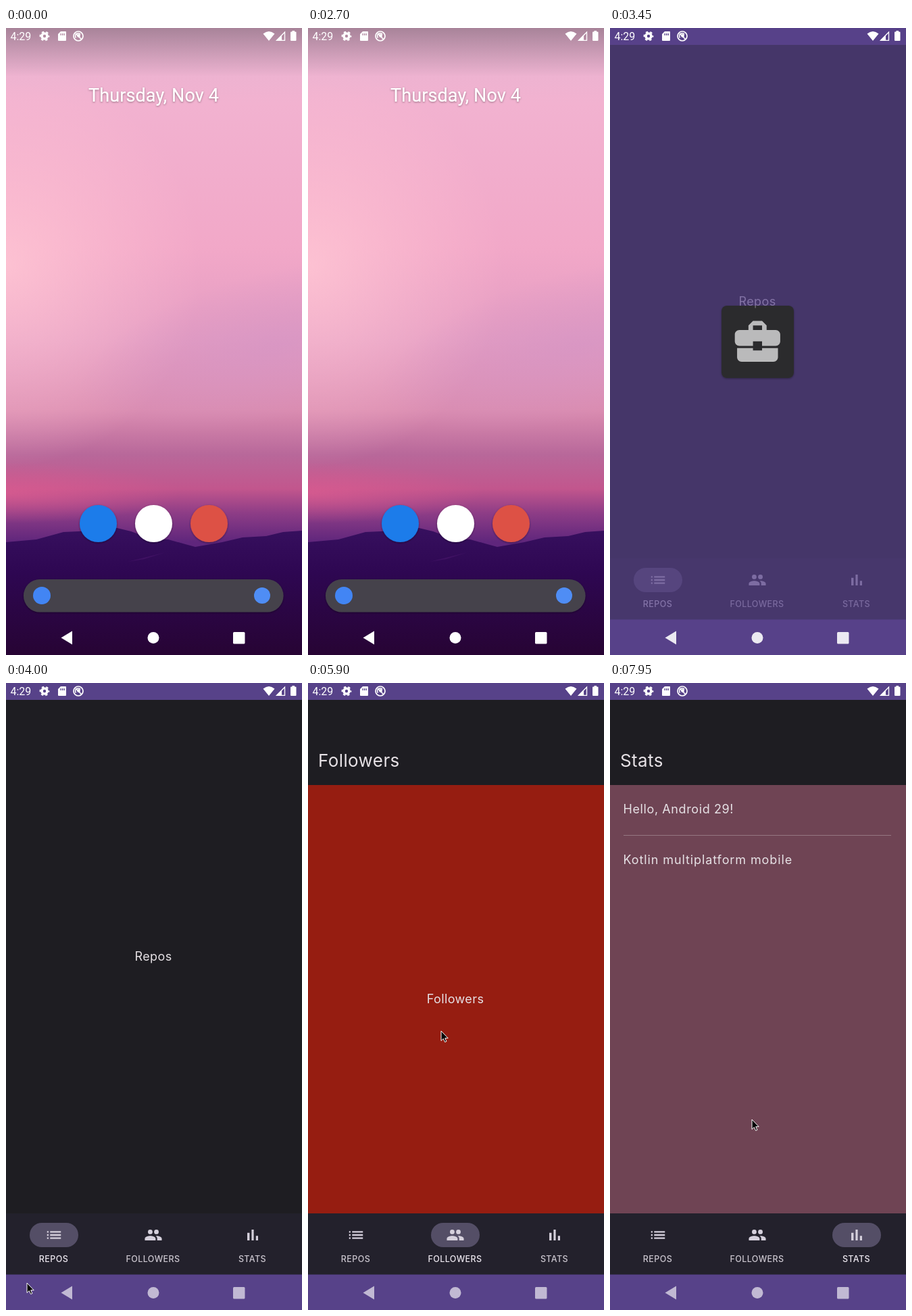
An HTML page that plays this animation: 438x928 px, repeating every 8000 ms.

```html
<!DOCTYPE html>
<html lang="en">
<head>
<meta charset="utf-8">
<title>Phone app launch</title>
<style>
html, body { margin: 0; width: 100%; height: 100%; overflow: hidden; background: #1e1d22; }
svg { display: block; width: 438px; height: 928px; font-family: Inter, "Open Sans", sans-serif; }
.roboto { font-family: Roboto, sans-serif; fill: #fff; }
.body { font-size: 18px; fill: #e6e1e5; letter-spacing: .4px; }
.title { font-size: 26px; fill: #e6e1e5; letter-spacing: .4px; }
.tab { font-size: 12.5px; font-weight: 500; letter-spacing: .4px; }
.mid { text-anchor: middle; }
</style>
</head>
<body>
<svg viewBox="0 0 438 928">
  <defs>
    <linearGradient id="sky" x2="0" y2="1">
      <stop offset="0" stop-color="#e6b4d2"/>
      <stop offset=".12" stop-color="#f2b2d0"/>
      <stop offset=".35" stop-color="#f2a8c8"/>
      <stop offset=".5" stop-color="#e39cc2"/>
      <stop offset=".61" stop-color="#da8cb0"/>
      <stop offset=".68" stop-color="#b8689a"/>
      <stop offset=".735" stop-color="#c2568d"/>
      <stop offset=".775" stop-color="#8c3c86"/>
      <stop offset=".82" stop-color="#5f267c"/>
    </linearGradient>
    <radialGradient id="glow" gradientUnits="userSpaceOnUse" cx="0" cy="0" r="1"
      gradientTransform="translate(0 350) scale(290 300)">
      <stop offset="0" stop-color="#ffc6d4" stop-opacity=".85"/>
      <stop offset="1" stop-color="#ffc0d2" stop-opacity="0"/>
    </radialGradient>
    <radialGradient id="haze" gradientUnits="userSpaceOnUse" cx="0" cy="0" r="1"
      gradientTransform="translate(400 470) rotate(-14) scale(300 110)">
      <stop offset="0" stop-color="#d494c4" stop-opacity=".65"/>
      <stop offset="1" stop-color="#d494c4" stop-opacity="0"/>
    </radialGradient>
    <radialGradient id="dusk" gradientUnits="userSpaceOnUse" cx="0" cy="0" r="1"
      gradientTransform="translate(0 688) scale(260 45)">
      <stop offset="0" stop-color="#dc5c90" stop-opacity=".75"/>
      <stop offset="1" stop-color="#dc5c90" stop-opacity="0"/>
    </radialGradient>
    <linearGradient id="hill" x2="0" y2="1">
      <stop offset="0" stop-color="#37105f"/>
      <stop offset=".35" stop-color="#2e0752"/>
      <stop offset="1" stop-color="#270434"/>
    </linearGradient>
    <linearGradient id="scrim" x2="0" y2="1">
      <stop offset="0" stop-color="#000" stop-opacity=".27"/>
      <stop offset="1" stop-color="#000" stop-opacity="0"/>
    </linearGradient>
    <filter id="shadow" x="-20%" y="-20%" width="140%" height="150%">
      <feDropShadow dx="0" dy="1" stdDeviation="1.5" flood-opacity=".4"/>
    </filter>
  </defs>

  <g id="home">
    <rect width="438" height="928" fill="url(#sky)"/>
    <rect width="438" height="928" fill="url(#glow)"/>
    <rect width="438" height="928" fill="url(#haze)"/>
    <rect width="438" height="928" fill="url(#dusk)"/>
    <path fill="url(#hill)" d="M0 761L45 757 85 746 130 744 160 739 185 745 215 756 240 757 280 768 320 761 350 754 385 752 410 746 438 744V928H0z"/>
    <path fill="#4a176c" opacity=".6" d="M180 790L236 776 205 786z"/>
    <rect width="438" height="72" fill="url(#scrim)"/>
    <text class="roboto mid" x="218.5" y="109" font-size="27" letter-spacing=".1" filter="url(#shadow)">Thursday, Nov 4</text>
    <g filter="url(#shadow)">
      <circle cx="136.5" cy="733.5" r="27.5" fill="#1a7bea"/>
      <circle cx="218.5" cy="733.5" r="27.5" fill="#fff"/>
      <circle cx="300.5" cy="733.5" r="27.5" fill="#dd5144"/>
      <rect x="26" y="816" width="384.5" height="48.5" rx="24.2" fill="#45434c"/>
    </g>
    <circle cx="53" cy="840" r="13" fill="#4285f4"/>
    <circle cx="379" cy="840" r="12" fill="#4f8df5"/>
  </g>

  <g id="app">
    <rect width="438" height="928" fill="#1e1d22"/>
    <g id="repos"><text class="body mid" x="218" y="411">Repos</text></g>
    <g id="followers">
      <rect y="25" width="438" height="127" fill="#1e1d22"/>
      <rect y="151" width="438" height="635" fill="#961d11"/>
      <text class="title" x="15" y="124">Followers</text>
      <text class="body mid" x="218" y="474">Followers</text>
    </g>
    <g id="stats">
      <rect y="25" width="438" height="127" fill="#1e1d22"/>
      <rect y="151" width="438" height="635" fill="#6f4454"/>
      <text class="title" x="15" y="124">Stats</text>
      <text class="body" x="19.5" y="193" style="letter-spacing:.6px">Hello, Android 29!</text>
      <rect x="20" y="225" width="396" height="1" fill="#957782"/>
      <text class="body" x="19.5" y="268" style="letter-spacing:.9px">Kotlin multiplatform mobile</text>
    </g>
    <rect y="785" width="438" height="91" fill="#23212c"/>
    <g id="tabs"></g>
    <path fill="#574289" d="M0 0h438v25H0zM0 875.500h438V928H0z"/>
  </g>

  <g id="splash">
    <rect width="438" height="928" fill="#574289"/>
    <rect x="165" y="411" width="107" height="107" rx="8" fill="#313133" filter="url(#shadow)"/>
    <path fill="#fff" transform="translate(218.300 463.700) scale(3.360) translate(-12 -12)" d="M10 16v-1H3v4c0 1.100.9 2 2 2h14c1.100 0 2-.9 2-2v-4h-7v1zM20 7h-4V5l-2-2h-4L8 5v2H4C2.900 7 2 7.900 2 9v3c0 1.100.9 2 2 2h6v-2h4v2h6c1.100 0 2-.9 2-2V9c0-1.100-.9-2-2-2zM14 7h-4V5h4z"/>
  </g>

  <g id="status" fill="#fff">
    <text class="roboto" x="6.500" y="18" font-size="16">4:29</text>
    <circle cx="57" cy="12" r="4" fill="none" stroke="#fff" stroke-width="3.600"/>
    <circle cx="57" cy="12" r="6.400" fill="none" stroke="#fff" stroke-width="2" stroke-dasharray="3.350" stroke-dashoffset="1.670"/>
    <path fill-rule="evenodd" d="M81 5h7q1 0 1 1v12q0 1-1 1H78q-1 0-1-1V9zM80.500 8v3h1.300V8zM83 8v3h1.300V8zM85.500 8v3h1.300V8z"/>
    <g fill="none" stroke="#fff" stroke-width="1.700">
      <circle cx="107" cy="12" r="7"/>
      <path d="M103.500 14.500a4 4 0 0 1 6.500-5M103 8l8.500 8.500"/>
    </g>
    <circle cx="107.500" cy="11.500" r="2.400"/>
    <path d="M380.500 8.500Q389 1.500 397.500 8.500L389 19zM421 6.500q0-1 1-1h1.500V4h3.500v1.500h1.500q1 0 1 1V18q0 1-1 1H422q-1 0-1-1z"/>
    <path d="M400.500 18.300H412.500V6.200z" fill="none" stroke="#fff" stroke-width="1.300"/>
    <path d="M400 18.500H408V10.500z"/>
  </g>
  <g id="nav" fill="#fff">
    <path d="M81.500 902.500L98 892.500V912.500z"/>
    <circle cx="218" cy="902.500" r="8.500"/>
    <rect x="336" y="894" width="17.500" height="17.500" rx="1.500"/>
  </g>
  <path id="cursor" d="M0 0v14.500l3.300-3 2.300 5 2.300-1-2.200-4.800h4.500z" fill="#000" stroke="#fff"/>
</svg>
<script>
const LOOP = 8000, FOLLOWERS_AT = 5400, STATS_AT = 6900;
const $ = id => document.getElementById(id);
const clamp = v => Math.max(0, Math.min(1, v));
const ramp = (t, start, length) => clamp((t - start) / length);
const smooth = p => p * p * (3 - 2 * p);
const fade = (id, v) => $(id).setAttribute('opacity', v);

const tabs = [
  ['REPOS', 71, 'M3 13h2v-2H3zM3 17h2v-2H3zM3 9h2V7H3zM7 13h14v-2H7zM7 17h14v-2H7zM7 7v2h14V7z'],
  ['FOLLOWERS', 218, 'M16 11a3 3 0 1 0 0-6 3 3 0 0 0 0 6zM8 11a3 3 0 1 0 0-6 3 3 0 0 0 0 6zM8 13c-2.300 0-7 1.200-7 3.500V19h14v-2.500c0-2.300-4.700-3.500-7-3.500zM16 13l-1 .05c1.200.85 2 2 2 3.450V19h6v-2.500c0-2.300-4.700-3.500-7-3.500z'],
  ['STATS', 365, 'M5 9.200h3V19H5zM10.600 5h2.800v14h-2.800zM16.200 13H19v6h-2.800z']
];
$('tabs').innerHTML = tabs.map(([name, x, icon], i) => `
  <g transform="translate(${x} 817)">
    <rect id="pill${i}" x="-36" y="-18" width="72" height="36" rx="18" fill="#544e66"/>
    <path d="${icon}" fill="#d5d0dc" transform="scale(1.140) translate(-12 -12)"/>
    <text id="label${i}" class="tab mid" y="40" x="-.5" fill="#ece7ef">${name}</text>
  </g>`).join('');

// Pointer stops: time, x, y
const stops = [
  [4000, 31, 888], [4050, 212, 340], [4200, 212, 340], [4400, 268, 600],
  [4580, 75, 820], [4750, 110, 520], [4950, 207, 260], [5000, 207, 264],
  [5300, 216, 838], [5550, 216, 838], [5900, 197, 515], [6150, 131, 128],
  [6300, 150, 140], [6650, 374, 842], [7150, 374, 842], [7500, 222, 650],
  [7550, 222, 650], [7750, 47, 181], [7950, 210, 646], [8000, 212, 650]
];

function pointer(t) {
  const i = stops.findIndex(s => s[0] > t);
  const [t0, x0, y0] = stops[i - 1], [t1, x1, y1] = stops[i];
  const p = t1 - t0 > 50 ? smooth(ramp(t, t0, t1 - t0)) : 0;
  return [x0 + (x1 - x0) * p, y0 + (y1 - y0) * p];
}

function draw(t) {
  const open = ramp(t, 2800, 250);
  const splash = clamp(open * 1.25) * (1 - ramp(t, 3390, 200));
  const scale = .8 + .2 * smooth(open);
  fade('splash', splash);
  $('splash').setAttribute('transform',
    `translate(219 464) scale(${scale}) translate(-219 -464)`);

  const inApp = t >= 3390;
  fade('app', +inApp);
  fade('nav', inApp ? .63 + .37 * splash : 1);

  const followers = ramp(t, FOLLOWERS_AT, 200), stats = ramp(t, STATS_AT, 200);
  fade('repos', 1 - followers);
  fade('followers', followers);
  fade('stats', stats);
  [1 - followers, followers * (1 - stats), stats].forEach((on, i) => {
    fade('pill' + i, on);
    $('pill' + i).setAttribute('transform', `scale(${.5 + on / 2} 1)`);
    fade('label' + i, .83 + .17 * on);
  });

  fade('cursor', +(t >= 4000));
  if (t >= 4000) $('cursor').setAttribute('transform', `translate(${pointer(t)})`);
}

const start = performance.now();
(function tick() {
  draw((performance.now() - start) % LOOP);
  requestAnimationFrame(tick);
})();
</script>
</body>
</html>
```
